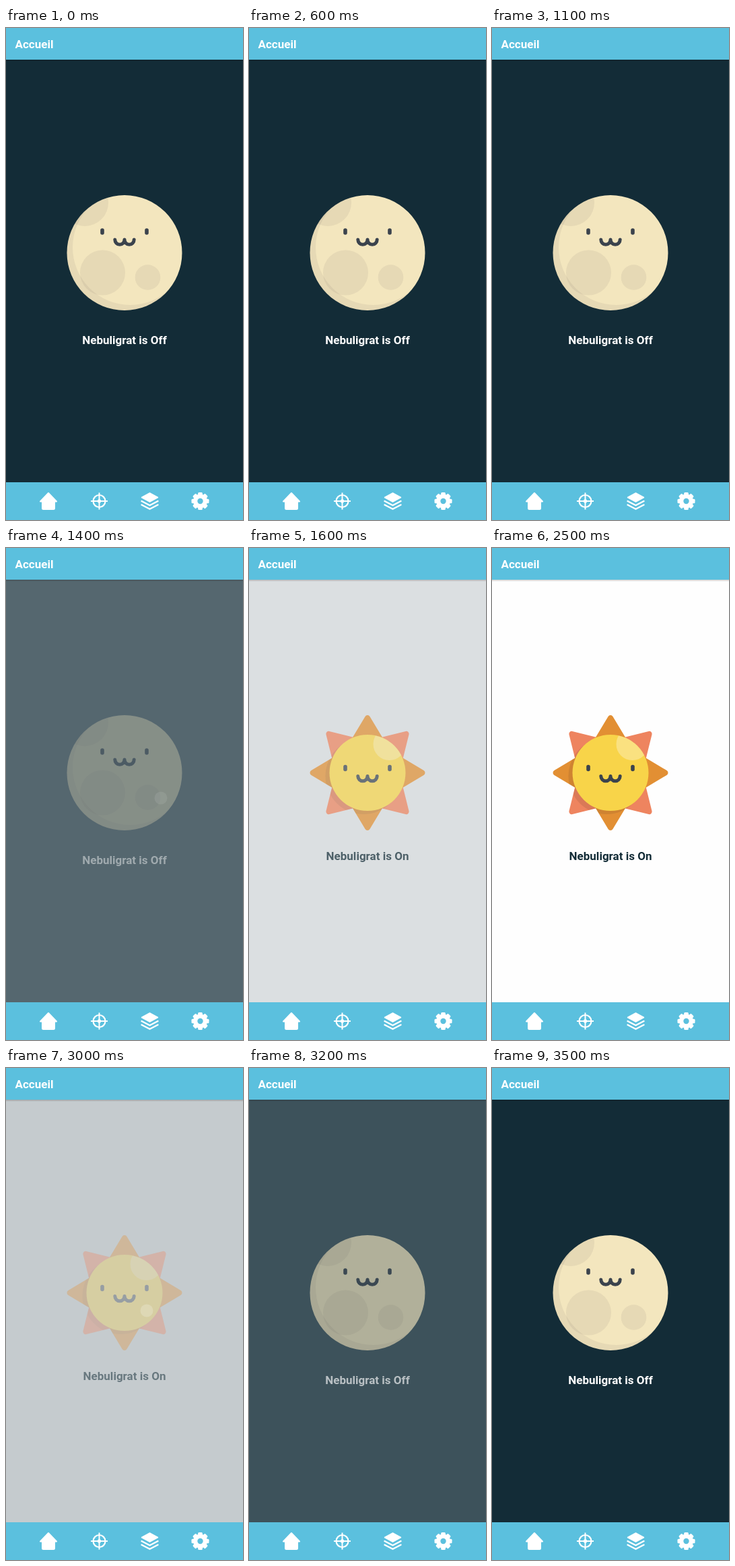
An HTML page that plays this animation: 352x730 px, repeating every 3600 ms.

```html
<!DOCTYPE html>
<html lang="fr">
<head>
<meta charset="utf-8">
<title>Accueil</title>
<style>
html, body { margin: 0; width: 100%; height: 100%; overflow: hidden; }
svg { display: block; width: 352px; height: 730px; }
text { font: 700 17px Roboto, sans-serif; }
</style>
</head>
<body>
<svg viewBox="0 0 352 730">
  <defs>
    <clipPath id="moonClip"><circle cx="176" cy="333.5" r="85.5"/></clipPath>
    <clipPath id="sunClip"><circle cx="176" cy="333.5" r="56.5"/></clipPath>
    <clipPath id="rayClip"></clipPath>
    <linearGradient id="shadow" x2="0" y2="1">
      <stop stop-color="#000" stop-opacity=".2"/>
      <stop offset="1" stop-color="#000" stop-opacity="0"/>
    </linearGradient>
    <g id="face">
      <rect x="140.2" y="297.2" width="5.6" height="9.6" rx="2.8" fill="#3b434d"/>
      <rect x="206.2" y="297.2" width="5.6" height="9.6" rx="2.8" fill="#3b434d"/>
      <path d="M161.8 314a7.1 7.3 0 0 0 14.2 0a7.1 7.3 0 0 0 14.2 0" fill="none" stroke="#3b434d"
        stroke-width="5" stroke-linecap="round" stroke-linejoin="round"/>
    </g>
  </defs>

  <rect id="page" width="352" height="730"/>
  <rect y="47" width="352" height="3" fill="url(#shadow)"/>

  <g id="moon">
    <circle cx="176" cy="333.5" r="85.5" fill="#f3e6be"/>
    <g clip-path="url(#moonClip)" fill="#3c323c" fill-opacity=".07">
      <path fill-rule="evenodd" d="M90 248h172v172h-172zM99 325.5a85.5 85.5 0 0 0 171 0a85.5 85.5 0 0 0-171 0z"/>
      <circle cx="117" cy="259" r="35"/>
      <circle cx="143.5" cy="363" r="33.5"/>
      <circle cx="210.5" cy="370" r="18.8"/>
    </g>
    <use href="#face"/>
  </g>

  <g id="sun">
    <g id="rays"></g>
    <circle cx="170" cy="338.5" r="56.5" fill="#5a3c28" fill-opacity=".14" clip-path="url(#rayClip)"/>
    <circle cx="176" cy="333.5" r="56.5" fill="#f8d449"/>
    <circle cx="208.5" cy="291" r="24" fill="#fff" fill-opacity=".3" clip-path="url(#sunClip)"/>
    <use href="#face" y="24.5"/>
  </g>

  <text id="offText" x="176" y="469" text-anchor="middle" fill="#fff">Nebuligrat is Off</text>
  <text id="onText" x="176" y="463" text-anchor="middle" fill="#132c37">Nebuligrat is On</text>
  <circle id="touch" r="9.5" fill="#fff"/>

  <g fill="#5bc0de">
    <rect width="352" height="47"/>
    <rect y="674" width="352" height="56"/>
  </g>
  <text x="13.5" y="30" fill="#fff">Accueil</text>

  <g fill="#fff" stroke="#fff" stroke-linejoin="round">
    <path transform="translate(63 702)" stroke-width="2"
      d="M0-12L12 0.5H9V10.500Q9 12 7.500 12H-7.500Q-9 12-9 10.500V0.500H-12z"/>
    <g transform="translate(138.500 702)">
      <circle r="9" fill="none" stroke-width="2.200"/>
      <path d="M-12.500 0H12.500M0-12.500V12.500" stroke-width="2"/>
      <circle r="2.700" stroke="none"/>
    </g>
    <g transform="translate(213.500 702)">
      <path d="M0-12L12-5.500L0 1L-12-5.500z" stroke-width="1.500"/>
      <path d="M-12 0L0 6.300L12 0M-12 5.500L0 11.800L12 5.500" fill="none" stroke-width="2.400" stroke-linecap="round"/>
    </g>
    <g id="gear" transform="translate(288.500 702)" stroke="none">
      <circle r="10.500"/>
    </g>
  </g>
</svg>
<script>
const $ = id => document.getElementById(id);
const NS = "http://www.w3.org/2000/svg";
const add = (parent, tag, attrs) => {
  const el = document.createElementNS(NS, tag);
  for (const k in attrs) el.setAttribute(k, attrs[k]);
  parent.appendChild(el);
};

const ray = "M-26.6-45L-3.43-83.56A4 4 0 0 1 3.43-83.56L26.6-45z";
for (const [start, fill] of [[45, "#ee845f"], [0, "#e28f33"]]) {
  for (let k = 0; k < 4; k++) {
    const attrs = { d: ray, fill, transform: `translate(176 333.5) rotate(${start + k * 90})` };
    add($("rays"), "path", attrs);
    add($("rayClip"), "path", attrs);
  }
}
for (let k = 0; k < 8; k++) {
  add($("gear"), "rect", { x: -3.3, y: -13, width: 6.6, height: 6, rx: 1.5, transform: `rotate(${k * 45})` });
}
add($("gear"), "circle", { r: 4.2, fill: "#5bc0de" });

const LOOP = 3600, STEP = 100, FADE = 500;
const DARK = [19, 44, 55], LIGHT = [254, 254, 254];
const taps = [
  { at: 1222, x: 230, y: 371, gone: 1430 },
  { at: 2837, x: 209, y: 360, gone: 3070 }
];

const clamp = v => Math.max(0, Math.min(1, v));
const ease = t => t < .5 ? (2 * t) ** 1.7 / 2 : 1 - (2 - 2 * t) ** 1.7 / 2;
const ramp = (t, from, length) => ease(clamp((t - from) / length));

// Pressed pictures dim quickly, then recover after release.
const press = (t, at) => 1 - .8 * (ramp(t, at - 120, 120) - ramp(t, at + 30, 250));

function draw(t) {
  const [on, off] = taps;
  const p = ramp(t, on.at, FADE) - ramp(t, off.at, FADE);
  const dim = press(t, on.at) * press(t, off.at);
  const night = clamp(1 - 2 * p), day = clamp(2 * p - 1);

  $("page").setAttribute("fill", `rgb(${DARK.map((c, i) => Math.round(c + (LIGHT[i] - c) * p))})`);
  $("moon").setAttribute("opacity", night * dim);
  $("sun").setAttribute("opacity", day * dim);
  $("offText").setAttribute("opacity", night);
  $("onText").setAttribute("opacity", day);

  const tap = t < 2000 ? on : off;
  $("touch").setAttribute("cx", tap.x);
  $("touch").setAttribute("cy", tap.y);
  $("touch").setAttribute("opacity", t > tap.at - 120 ? .3 * clamp((tap.gone - t) / 100) : 0);
}

const begin = performance.now();
function tick() {
  const t = (performance.now() - begin) % LOOP;
  draw(Math.floor(t / STEP) * STEP);
  requestAnimationFrame(tick);
}
tick();
</script>
</body>
</html>
```
